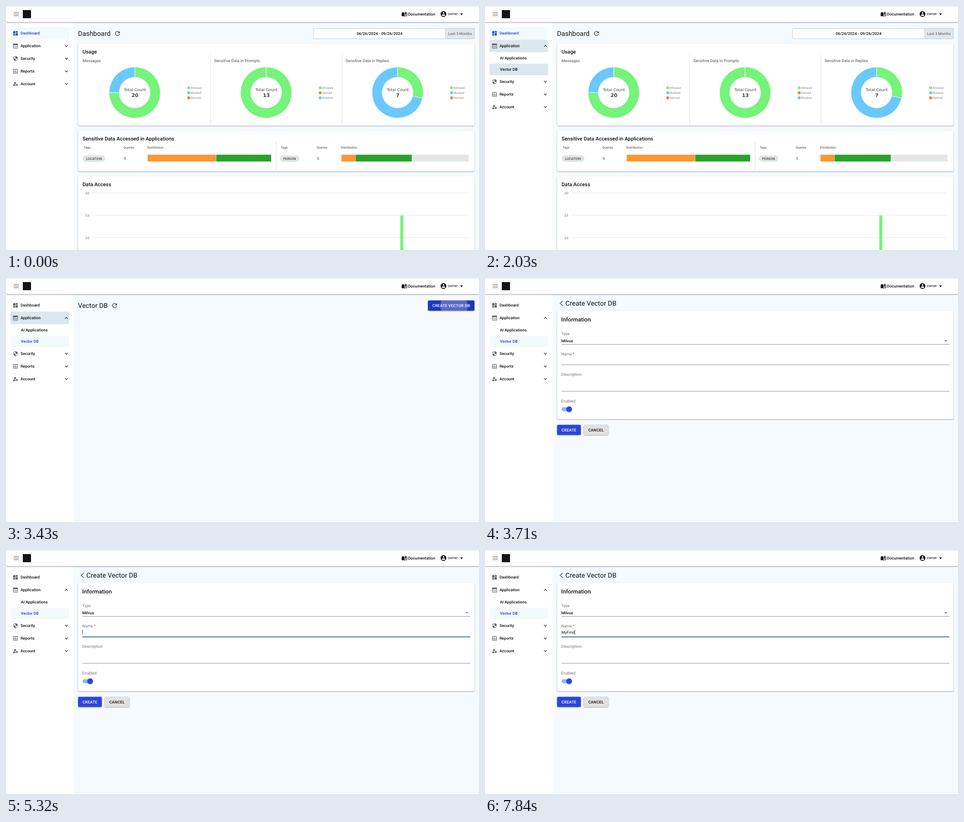
An HTML page that plays this animation: 1040x539 px, repeating every 8000 ms.

```html
<!DOCTYPE html>
<html lang="en">
<head>
<meta charset="utf-8">
<title>Dashboard walkthrough</title>
<style>
  html, body { margin: 0; width: 100%; height: 100%; overflow: hidden; background: #fff; }
  svg { display: block; width: 1040px; height: 539px; }
  text { font-family: Roboto, sans-serif; font-size: 8.8px; fill: #111; text-rendering: geometricPrecision; white-space: pre; }
  .m { font-weight: 500; font-size: 8.75px; }
  .h1 { font-size: 14.8px; }
  .h2 { font-size: 11.25px; font-weight: 500; }
  .h3 { font-size: 12.4px; font-weight: 500; }
  .lab { fill: #4a4f55; }
  .form { fill: #757575; }
  .th { font-size: 7px; fill: #444; }
  .chip { font-size: 7.45px; fill: #222; text-anchor: middle; }
  .btn { font-size: 8.7px; letter-spacing: .2px; text-anchor: middle; font-weight: 500; }
  .dj { font-family: "DejaVu Sans", sans-serif; }
  .mid { text-anchor: middle; }
  .card { fill: #fff; filter: drop-shadow(0 1px .8px rgba(0,0,0,.36)); }
  .raised { filter: drop-shadow(0 1px 1px rgba(0,0,0,.35)); }
</style>
</head>
<body>
<svg id="stage" viewBox="0 0 1040 539" xmlns="http://www.w3.org/2000/svg"></svg>
<script>
const GREEN = '#75f37a', BLUE = '#6bc8fd', CORAL = '#f87c50', BRAND = '#2b47d8', GREY = '#5c5c5c';

const rect = (x, y, w, h, fill, more = '') =>
  `<rect x="${x}" y="${y}" width="${w}" height="${h}" fill="${fill}" ${more}/>`;
const card = (y, h) => `<rect class="card" x="158.5" y="${y}" width="871.5" height="${h}" rx="2.5"/>`;
const text = (x, y, s, cls = '', more = '') => `<text x="${x}" y="${y}" class="${cls}" ${more}>${s}</text>`;
const line = (x1, y1, x2, y2, color, w = 1, more = '') =>
  `<line x1="${x1}" y1="${y1}" x2="${x2}" y2="${y2}" stroke="${color}" stroke-width="${w}" ${more}/>`;
const group = (id, body) => `<g id="${id}">${body}</g>`;

// Icons live in a 24-unit box centred on (cx, cy).
const ICONS = {
  grid: 'M3 13h8V3H3v10zm0 8h8v-6H3v6zm10 0h8V11h-8v10zm0-18v6h8V3h-8z',
  reload: 'M17.65 6.35C16.2 4.9 14.21 4 12 4c-4.42 0-7.99 3.58-7.99 8s3.57 8 7.99 8c3.73 0 6.84-2.55 7.73-6h-2.08c-.82 2.33-3.04 4-5.65 4-3.31 0-6-2.69-6-6s2.69-6 6-6c1.66 0 3.14.69 4.22 1.78L13 11h7V4l-2.35 2.35z',
  user: 'M12 2C6.48 2 2 6.48 2 12s4.48 10 10 10 10-4.48 10-10S17.52 2 12 2zm0 3c1.66 0 3 1.34 3 3s-1.34 3-3 3-3-1.34-3-3 1.34-3 3-3zm0 14.2c-2.5 0-4.71-1.28-6-3.22.03-1.99 4-3.08 6-3.08 1.99 0 5.97 1.09 6 3.08-1.29 1.94-3.5 3.22-6 3.22z',
  book: 'M19 1l-5 5v11l5-4.5V1zM1 6v14.65c0 .25.25.5.5.5 1.6-.7 3.55-1.15 5-1.15 1.95 0 4.05.4 5.5 1.5V6c-1.45-1.1-3.55-1.5-5.5-1.5S2.45 4.9 1 6zm22 13.5V6c-.6-.45-1.25-.75-2-1v13.5c-1.1-.35-2.3-.5-3.5-.5-1.7 0-4.15.65-5.5 1.5v2c1.35-.85 3.8-1.5 5.5-1.5 1.65 0 3.35.3 4.75 1.05.5.1.75-.2.75-.45z',
  window: 'M4 2h16a2 2 0 0 1 2 2v16a2 2 0 0 1-2 2H4a2 2 0 0 1-2-2V4a2 2 0 0 1 2-2zm0 6v12h16V8zm6 2l1.2 1.2L8.4 14l2.8 2.8L10 18l-4-4zm4 0l4 4-4 4-1.2-1.2 2.8-2.8-2.8-2.8z',
  shield: 'M12 1L3 5v6c0 5.55 3.84 10.74 9 12 5.16-1.26 9-6.45 9-12V5l-9-4zm0 10.99h7c-.53 4.12-3.28 7.79-7 8.94V12H5V6.3l7-3.11v8.8z',
  chart: 'M9 17H7v-7h2v7zm4 0h-2V7h2v10zm4 0h-2v-4h2v4zm2 2H5V5h14v14zm0-16H5c-1.1 0-2 .9-2 2v14c0 1.1.9 2 2 2h14c1.1 0 2-.9 2-2V5c0-1.1-.9-2-2-2z',
  person: 'M10 4a4 4 0 1 0 0 8 4 4 0 0 0 0-8zM10.7 13C7.5 12.8 5 13.8 3.4 14.8 2.5 15.3 2 16.300 2 17.300V20h9.300C10.300 18 9.700 15.500 10.700 13zM17 11.500a4.500 4.500 0 1 0 0 9 4.500 4.500 0 0 0 0-9zm0 2.800a1.700 1.700 0 1 1 0 3.400 1.700 1.700 0 0 1 0-3.400z',
  down: 'M16.59 8.59 12 13.17 7.41 8.59 6 10l6 6 6-6z',
  drop: 'M7 10l5 5 5-5z'
};
const icon = (name, cx, cy, k, fill, more = '') =>
  `<path d="${ICONS[name]}" fill="${fill}" fill-rule="evenodd" transform="translate(${cx} ${cy}) scale(${k}) translate(-12 -12)" ${more}/>`;

// Ring slice between two fractions of a turn.
function slice(cx, cy, a, b, fill) {
  const pt = (f, r) => `${cx + r * Math.sin(f * 2 * Math.PI)} ${cy - r * Math.cos(f * 2 * Math.PI)}`;
  const R = 56.3, r = 34, big = b - a > .5 ? 1 : 0;
  b = Math.min(b, a + .9999);
  return `<path d="M${pt(a, R)}A${R} ${R} 0 ${big} 1 ${pt(b, R)}L${pt(b, r)}A${r} ${r} 0 ${big} 0 ${pt(a, r)}Z" fill="${fill}" stroke="#fff" stroke-width=".8"/>`;
}

function donut(cx, share, total, names) {
  const colors = { Allowed: GREEN, Masked: BLUE, Denied: CORAL };
  const rest = share < 1 ? slice(cx, 191.2, share, 1, BLUE) : '';
  const legend = names.map((n, i) => {
    const y = 180.7 + i * 11.1;
    return `<circle cx="${cx + 118.8}" cy="${y}" r="3.3" fill="${colors[n]}"/>` +
      text(cx + 123.3, y + 2.2, n, 'dj', 'style="font-size:6.2px;fill:#7d7d7d"');
  }).join('');
  return slice(cx, 191.2, 0, share, GREEN) + rest + legend +
    text(cx + .5, 188.2, 'Total Count', 'dj mid', 'style="font-size:8.6px;fill:#444"') +
    text(cx + .5, 201.3, total, 'dj mid', 'style="font-size:10.9px;font-weight:700;fill:#444"');
}

function tagRow(x, label, chipX, chipW, count, countX, barX, parts) {
  return text(x, 315, 'Tags', 'th') + text(countX, 315, 'Queries', 'th') + text(barX - 1.2, 315, 'Distribution', 'th') +
    rect(chipX, 329.8, chipW, 14.4, '#e4e4e4', 'rx="7.2"') + text(chipX + chipW / 2, 339.7, label, 'chip') +
    text(countX + .6, 339.9, count, 'lab') +
    parts.map(([a, b, c]) => rect(a, 328.5, b - a, 15, c)).join('');
}

const chartLine = (v, i) => {
  const y = 413 + i * 49.3;
  return line(191, y, 1015, y, '#e6e6e6') + text(183.3, y + 3, v, 'dj', 'style="font-size:7.1px;fill:#666;text-anchor:end"');
};

const ORANGE = '#fe9632', LEAF = '#29a12b';
const dashboard =
  text(158.3, 65.9, 'Dashboard', 'h1') + icon('reload', 245, 60.8, .66, '#444') +
  rect(676.2, 49.5, 353.5, 23, '#fff', 'rx="2" stroke="#c3c8cc" stroke-width=".9"') +
  rect(966.5, 49.5, 63.2, 23, '#e2e7eb', 'stroke="#c3c8cc" stroke-width=".9"') +
  text(821.3, 63.8, '06/26/2024 - 09/26/2024', 'm mid') +
  text(998.2, 63.9, 'Last 3 Months', 'mid', 'style="font-size:8.2px;fill:#555"') +
  card(83, 181.3) + text(168.2, 105.4, 'Usage', 'h2') +
  text(168.3, 124, 'Messages', 'lab') + text(457.7, 124, 'Sensitive Data in Prompts', 'lab') +
  text(746.7, 124, 'Sensitive Data in Replies', 'lab') +
  line(450, 107, 450, 262.5, '#dcdcdc') + line(739, 107, 739, 262.5, '#dcdcdc') +
  donut(283, .75, 20, ['Allowed', 'Masked', 'Denied']) +
  donut(572, 1, 13, ['Allowed', 'Denied', 'Masked']) +
  donut(861, 2 / 7, 7, ['Allowed', 'Masked', 'Denied']) +
  card(275, 90.2) + text(168.2, 297, 'Sensitive Data Accessed in Applications', 'h2') +
  tagRow(170.7, 'LOCATION', 168.5, 50, 9, 258.2, 311.6, [[311.6, 461.6, ORANGE], [462.3, 583, LEAF]]) +
  tagRow(603.9, 'PERSON', 602, 43, 5, 682.9, 737.5, [[737.5, 768, ORANGE], [768.6, 892.3, LEAF], [892.3, 1017, '#e5e5e5']]) +
  line(594, 299, 594, 363.5, '#dcdcdc') +
  card(376, 175) + text(168.2, 398, 'Data Access', 'h2') +
  [20, 15, 10].map(chartLine).join('') + rect(867, 462.7, 6.6, 80, GREEN);

const foot = rect(148.5, 536, 892, 3, '#fff') + line(148.5, 535.5, 1040, 535.5, '#e3e8eb');

const listPage =
  text(158.3, 65.9, 'Vector DB', 'h1') + icon('reload', 238.8, 60.8, .66, '#444') +
  `<rect id="newBtn" class="raised" x="927.7" y="49.6" width="102.3" height="22.6" rx="2.5"/>` +
  `<g clip-path="url(#btnClip)"><circle id="ripple" cx="985" cy="61" r="0" fill="#fff" opacity=".25"/></g>` +
  text(979, 64.1, 'CREATE VECTOR DB', 'btn', 'style="fill:#fff"') + foot;

const formPage =
  '<path d="M171 50.700 165 56 171 61.400" fill="none" stroke="#4a4a4a" stroke-width="1.300"/>' +
  text(176.8, 61.2, 'Create Vector DB', 'h1') +
  card(71.8, 240) + text(167.6, 96.3, 'Information', 'h3') +
  text(167.8, 126.3, 'Type', 'form') + text(167.7, 141.6, 'Milvus', 'm') + icon('drop', 1013.2, 138.7, .62, '#707070') +
  line(168, 146.7, 1021, 146.7, '#8c8c8c') +
  text(167.8, 171.2, 'Name<tspan fill="#ee5a30" dx="1.700">*</tspan>', 'form') +
  line(168, 191.7, 1021, 191.7, '#8c8c8c', 1, 'id="under"') + line(168, 191.7, 1021, 191.7, '#2c68c4', 1.6, 'id="focus"') +
  text(168, 185.2, '', '', 'id="typed"') + line(0, 176.3, 0, 187, '#111', .8, 'id="caret"') +
  text(167.8, 216.2, 'Description', 'form') + line(168, 250.2, 1021, 250.2, '#8c8c8c') +
  text(167.8, 274.6, 'Enabled', 'form') +
  rect(168.3, 285.400, 21, 8.8, '#7fc0f4', 'rx="4.400"') +
  `<circle class="raised" cx="185" cy="289.800" r="6.200" fill="${BRAND}"/>` +
  rect(158.5, 324.2, 52.2, 22.6, BRAND, 'rx="2.500" class="raised"') + text(184.6, 338.800, 'CREATE', 'btn', 'style="fill:#fff"') +
  rect(217, 324.2, 54.3, 22.6, '#e1e1e1', 'rx="2.500" class="raised"') + text(244, 338.800, 'CANCEL', 'btn') + foot;

const navRow = (y, label, ic, k) => icon(ic, 20.9, y + .3, k, GREY) + text(31.9, y + 3.2, label, 'm') + icon('down', 132.8, y + .2, .56, '#111');

const sidebar = rect(0, 36, 148.5, 503, '#fff') +
  rect(10, 47, 128.7, 27.3, '#f3fafe', 'id="homeBg" rx="2"') + rect(10, 74.4, 128.7, 27.5, 'none', 'id="appBg" rx="2"') +
  icon('grid', 20.9, 60.4, .55, GREY, 'id="homeIcon"') + text(31.9, 63.3, 'Dashboard', 'm', 'id="homeText"') +
  icon('window', 20.9, 88.4, .54, GREY) + text(31.9, 91.300, 'Application', 'm') +
  group('arrow', icon('down', 132.8, 88.3, .56, '#111')) +
  `<g clip-path="url(#menuClip)">` +
  rect(10, 102, 128.7, 25.5, 'none', 'id="aiBg" rx="2"') + rect(10, 127.6, 128.7, 25.5, 'none', 'id="dbBg" rx="2"') +
  text(32.8, 117.800, 'AI Applications', 'm', 'style="font-size:8.700px"') + text(32.8, 143.300, 'Vector DB', 'm', 'id="dbText"') + '</g>' +
  group('lower', navRow(116, 'Security', 'shield', .51) + navRow(144, 'Reports', 'chart', .55) + navRow(171.9, 'Account', 'person', .54));

const header = rect(0, 0, 1040, 35.6, '#fff', 'style="filter:drop-shadow(0 1px 1.200px rgba(0,0,0,.45))"') +
  line(0, .4, 1040, .4, '#dedede', .8) +
  [14.3, 17.9, 21.5].map(y => line(16.6, y, 28, y, '#666', 1.1)).join('') +
  rect(37, 9, 18, 18, '#151515') +
  icon('book', 876, 17.900, .54, '#111') + text(883.8, 20.7, 'Documentation', 'm') +
  icon('user', 962, 17.800, .63, '#111') + text(971.3, 20.4, 'owner', '', 'style="font-size:8.100px"') +
  icon('drop', 1001.7, 17.900, .7, '#111');

const stage = document.getElementById('stage');
stage.innerHTML =
  '<defs><clipPath id="menuClip"><rect id="menuBox" x="0" y="102" width="148" height="0"/></clipPath>' +
  '<clipPath id="btnClip"><rect x="927.700" y="49.600" width="102.300" height="22.600" rx="2.500"/></clipPath></defs>' +
  rect(0, 0, 1040, 539, '#f4fafd') + group('home', dashboard) + group('list', listPage) + group('form', formPage) + sidebar + header;

const $ = id => document.getElementById(id);
const set = (id, attrs) => { for (const k in attrs) $(id).setAttribute(k, attrs[k]); };
const show = (id, on) => { $(id).style.display = on ? '' : 'none'; };
const clamp = v => Math.max(0, Math.min(1, v));
// Latest value in a [time, value] table.
const at = (steps, t) => steps.reduce((v, s) => t >= s[0] ? s[1] : v, steps[0][1]);

const LOOP = 8000, TICK = 70;
const PAGE = [[0, 'home'], [2450, 'list'], [3570, 'form']];
const OPEN = [[0, 0], [1540, 17], [1610, 41], [1680, 51]];
const APP_BG = [[0, 'none'], [1120, '#dbe6ed'], [1540, '#cad6de'], [1820, '#d3dfe6'], [1890, '#dbe6ed'], [3500, 'none']];
const AI_BG = [[0, 'none'], [1890, '#dbe6ed'], [2030, 'none']];
const DB_BG = [[0, 'none'], [2030, '#dbe6ed'], [2450, BRAND], [2660, '#f3fafe']];
const DB_INK = [[0, '#111'], [2450, '#fff'], [2660, '#2a3fb8']];
const TYPED = [[0, 0], [6160, 1], [6580, 2], [7000, 3], [7280, 4], [7490, 5], [7630, 6], [7770, 7]];
const CARET = [[0, false], [5040, true], [5530, false], [5950, true]];

function render(ms) {
  const t = Math.floor(ms / TICK) * TICK;
  const page = at(PAGE, t), open = at(OPEN, t), home = page === 'home';
  ['home', 'list', 'form'].forEach(id => show(id, id === page));

  set('homeBg', { fill: home ? '#f3fafe' : 'none' });
  set('homeIcon', { fill: home ? BRAND : GREY });
  $('homeText').style.fill = home ? '#2a3fb8' : '#111';
  set('appBg', { fill: at(APP_BG, t) });
  set('aiBg', { fill: at(AI_BG, t) });
  set('dbBg', { fill: at(DB_BG, t) });
  $('dbText').style.fill = at(DB_INK, t);
  set('menuBox', { height: open });
  set('lower', { transform: `translate(0 ${open})` });
  set('arrow', { transform: open ? 'rotate(180 132.8 88.3)' : '' });

  set('newBtn', { fill: t >= 3360 ? '#2138b4' : BRAND });
  set('ripple', { r: 60 * clamp((t - 3360) / 140) });

  const hover = clamp((t - 4200) / 420);
  const tone = Math.round(140 - 108 * hover);
  set('under', { stroke: `rgb(${tone},${tone},${tone})`, 'stroke-width': hover ? 1.6 : 1 });
  const half = 426.5 * (1 - (1 - clamp((t - 4970) / 350)) ** 3);
  set('focus', { x1: 594.5 - half, x2: 594.5 + half });

  const typed = $('typed');
  typed.textContent = 'MyFirst'.slice(0, at(TYPED, t));
  const x = 168.4 + (typed.textContent && page === 'form' ? typed.getComputedTextLength() : 0);
  set('caret', { x1: x, x2: x });
  show('caret', at(CARET, t));
}

const start = performance.now();
function frame() {
  render((performance.now() - start) % LOOP);
  requestAnimationFrame(frame);
}
frame();
</script>
</body>
</html>
```
